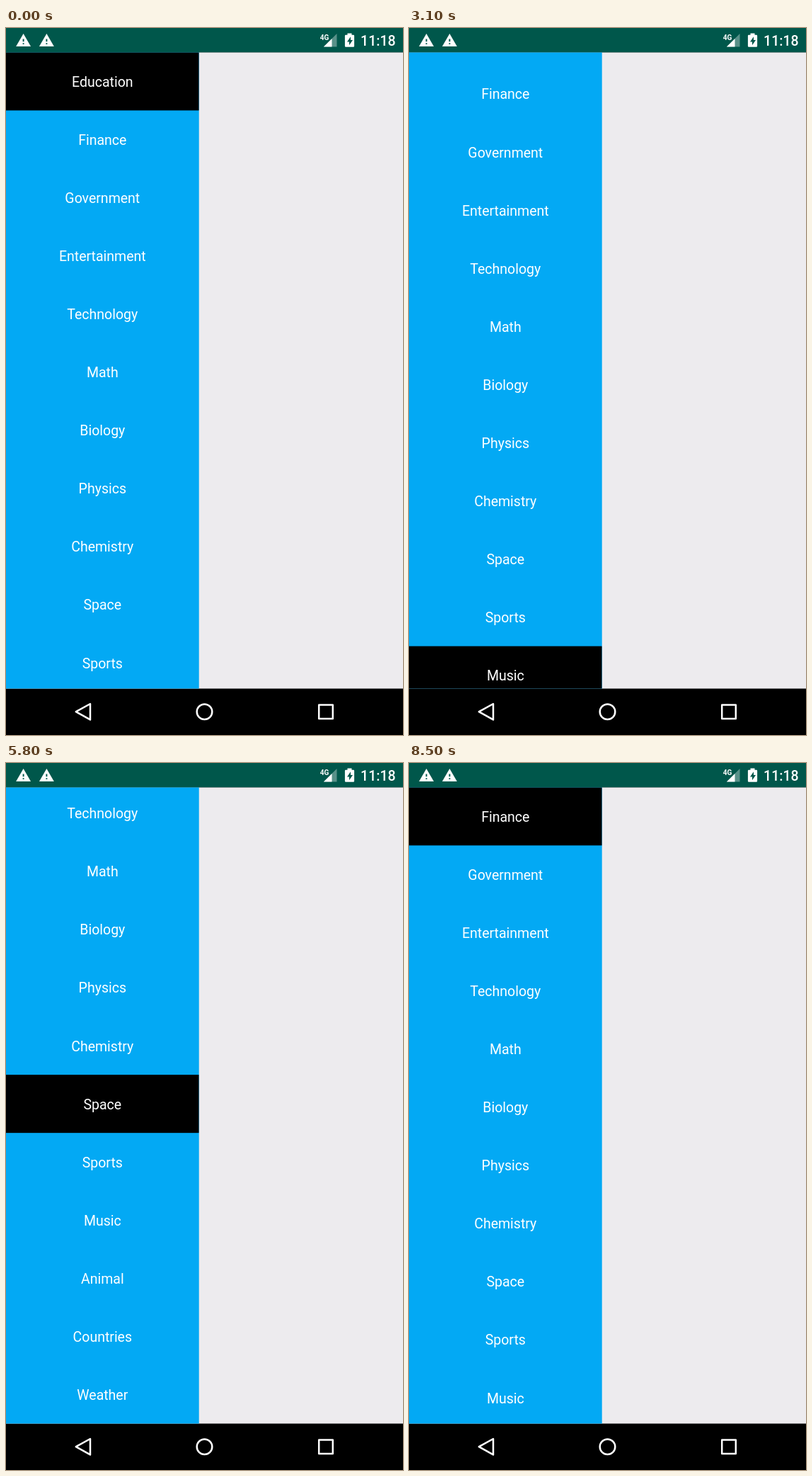
An HTML page for the animation above (8.9 s loop, 561 px wide and 998 px high).

```html
<!DOCTYPE html>
<html lang="en">
<head>
<meta charset="utf-8">
<title>Category list</title>
<style>
  html, body { margin: 0; width: 100%; height: 100%; overflow: hidden; background: #000; }
  svg { display: block; width: 561px; height: 998px; font-family: Roboto, sans-serif; fill: #fff; }
  #list text { font-size: 19.5px; text-anchor: middle; }
  .nav { fill: none; stroke: #fff; stroke-width: 2.5; stroke-linejoin: round; }
</style>
</head>
<body>
<svg viewBox="0 0 561 998">
  <defs>
    <clipPath id="view"><rect y="34.3" width="272.7" height="898.2"/></clipPath>
    <path id="warn" d="M1 21h22L12 2zM13 18h-2v-2h2zM13 14h-2v-4h2z" fill-rule="evenodd"/>
  </defs>

  <rect width="561" height="998" fill="#000"/>
  <rect y="34.3" width="561" height="898.2" fill="#edebee"/>
  <rect y="34.3" width="272.7" height="898.2" fill="#03a9f4"/>
  <g clip-path="url(#view)">
    <g id="list"><rect id="mark" width="272.7" fill="#000"/></g>
  </g>

  <rect width="561" height="34.3" fill="#00574b"/>
  <use href="#warn" transform="translate(13.2 6) scale(.95)"/>
  <use href="#warn" transform="translate(46 6) scale(.95)"/>
  <path d="M467.5 8v18.6h-18.6z" opacity=".35"/>
  <path d="M460.5 15v11.6h-11.6z"/>
  <rect x="443" y="7" width="14" height="11" fill="#00574b"/>
  <text x="443.8" y="16.6" font-size="10" font-weight="700" textLength="auto">4G</text>
  <path d="M482.5 7.6h6v2.2h2.4q1.2 0 1.2 1.2v14.6q0 1.2-1.2 1.2h-10.8q-1.2 0-1.2-1.2v-14.6q0-1.2 1.2-1.2h2.4z"/>
  <path d="M487 12.2l-5 7.2h3v4.8l5-7.2h-3z" fill="#00574b"/>
  <text x="550.6" y="24.8" font-size="19.5" font-weight="500" text-anchor="end">11:18</text>

  <path class="nav" d="M98.8 965.2L119 954v22.4z"/>
  <circle class="nav" cx="280.5" cy="965.2" r="10.8"/>
  <rect class="nav" x="442.2" y="955.4" width="19.6" height="19.6"/>
</svg>
<script>
const LOOP = 8900, TICK = 100, SCROLL_MS = 300;
const TOP = 34.3, VIEW = 898.2, ROW = 82.07;
const names = ['Education', 'Finance', 'Government', 'Entertainment', 'Technology',
  'Math', 'Biology', 'Physics', 'Chemistry', 'Space', 'Sports', 'Music', 'Animal',
  'Countries', 'Weather'];

// Key press times
const down = [300, 500, 800, 1000, 1300, 1700, 2000, 2300, 2600, 2680, 2956, 3357, 3683, 4137];
const up = [4800, 5000, 5300, 5500, 5800, 6100, 6400, 6700, 7100, 7180, 7348, 7748, 8148];
const presses = [...down.map(at => ({ at, dir: 1 })), ...up.map(at => ({ at, dir: -1 }))];

const list = document.getElementById('list');
const mark = document.getElementById('mark');
mark.setAttribute('height', ROW);

names.forEach((name, i) => {
  const label = document.createElementNS('http://www.w3.org/2000/svg', 'text');
  label.setAttribute('x', 136.3);
  label.setAttribute('y', (i + .5) * ROW + 7.5);
  label.textContent = name;
  list.append(label);
});

const easeOut = p => 1 - (1 - p) ** 2;

// Scrolls just far enough to reveal row i
function reveal(scroll, i) {
  return Math.max(Math.min(scroll, i * ROW), (i + 1) * ROW - VIEW);
}

function stateAt(t) {
  let row = 0, scroll = 0;
  for (const { at, dir } of presses) {
    if (t < at) break;
    row += dir;
    const delta = reveal(scroll, row) - scroll;
    if (!delta) continue;
    const duration = SCROLL_MS * Math.abs(delta) / ROW;
    scroll += delta * easeOut(Math.min(1, (t - at) / duration));
  }
  return { row, scroll };
}

const start = performance.now();
function draw() {
  const t = Math.max(0, performance.now() - start) % LOOP;
  const { row, scroll } = stateAt(Math.floor(t / TICK) * TICK);
  mark.setAttribute('y', row * ROW);
  list.setAttribute('transform', `translate(0 ${TOP - scroll})`);
  requestAnimationFrame(draw);
}
draw();
</script>
</body>
</html>
```
